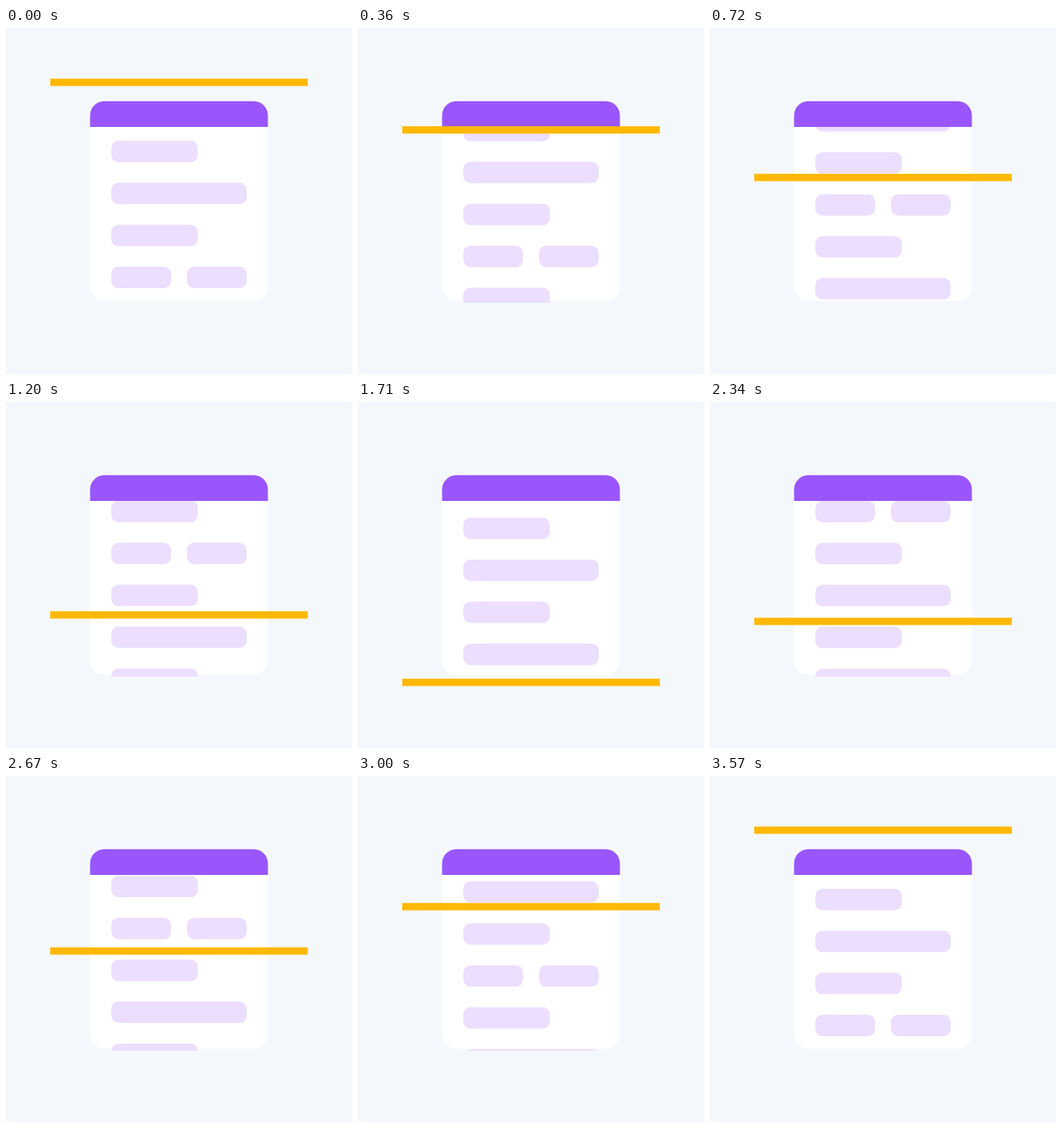
An HTML page for the animation above (3.63 s loop, 500 px wide and 500 px high).

```html
<!DOCTYPE html>
<html lang="en">
<head>
<meta charset="utf-8">
<title>Page scan</title>
<style>
  html, body { margin: 0; width: 100%; height: 100%; overflow: hidden; background: #f4f8fd; }
  svg { display: block; width: 100vw; height: 100vh; }

  .rows { fill: #ecdefe; animation: scroll 3630ms infinite; }
  .bar { fill: #ffb803; animation: scan 3630ms linear infinite; }

  /* One step is 30 ms, 121 steps per loop */
  @keyframes scan {
    0% { transform: translateY(0); }
    49.587% { transform: translateY(343.8px); }
    98.347%, 100% { transform: translateY(0); }
  }

  /* Two rows up, two more, then all the way back */
  @keyframes scroll {
    0% { transform: translateY(0); }
    2.479% { transform: translateY(0); animation-timing-function: cubic-bezier(.34, 0, .69, 1); }
    24.793% { transform: translateY(-121.25px); }
    27.273% { transform: translateY(-121.25px); animation-timing-function: cubic-bezier(.333, 0, .667, 1); }
    49.587% { transform: translateY(-242.5px); }
    52.066% { transform: translateY(-242.5px); animation-timing-function: cubic-bezier(.34, 0, .71, 1); }
    98.347%, 100% { transform: translateY(0); }
  }
</style>
</head>
<body>
<svg viewBox="0 0 500 500">
  <defs>
    <clipPath id="view"><rect x="121" y="125" width="258" height="271.5"/></clipPath>
    <rect id="short" x="152.2" width="125" height="31" rx="10.3"/>
    <rect id="wide" x="152.2" width="195.6" height="31" rx="10.3"/>
    <g id="pair">
      <rect x="152.2" width="86.3" height="31" rx="10.3"/>
      <rect x="261.5" width="86.3" height="31" rx="10.3"/>
    </g>
  </defs>

  <rect x="121.5" y="105.8" width="257" height="288.4" rx="20.6" fill="#fff"/>
  <g clip-path="url(#view)">
    <g class="rows">
      <use href="#short" y="163"/>
      <use href="#wide" y="223.6"/>
      <use href="#short" y="284.2"/>
      <use href="#pair" y="344.9"/>
      <use href="#short" y="405.5"/>
      <use href="#wide" y="466.1"/>
      <use href="#short" y="526.8"/>
      <use href="#wide" y="587.4"/>
    </g>
  </g>
  <path d="M121.5 143V126.4a20.6 20.6 0 0 1 20.6-20.6h215.8a20.6 20.6 0 0 1 20.6 20.6V143z" fill="#9a56fc"/>
  <rect class="bar" x="64" y="73" width="372.2" height="10.6"/>
</svg>
</body>
</html>
```
